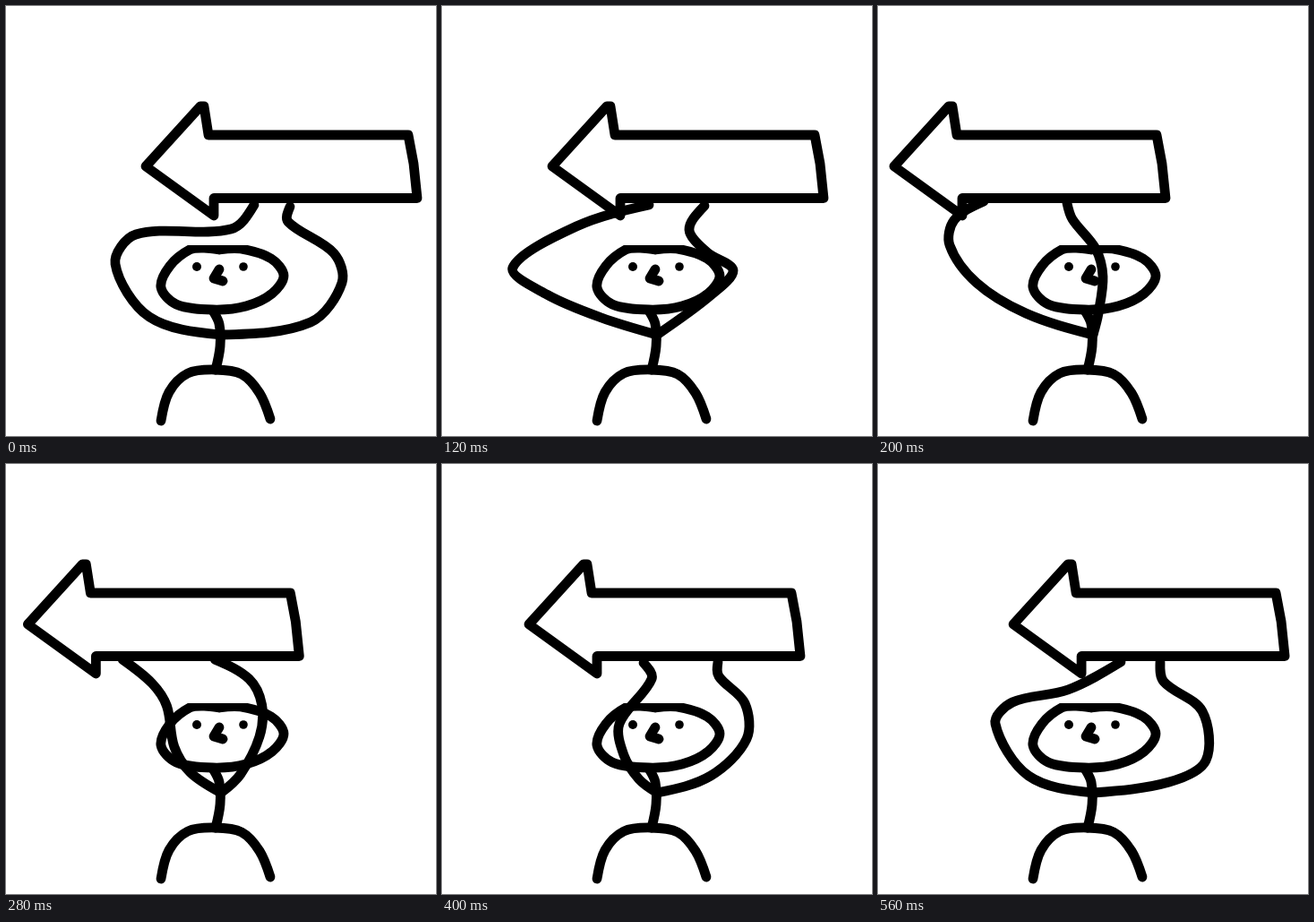
An HTML page for the animation above (600 ms loop, 480 px wide and 480 px high).

```html
<!DOCTYPE html>
<html lang="en">
<head>
<meta charset="utf-8">
<title>Sign spinner</title>
<style>
  html, body { margin: 0; width: 100%; height: 100%; overflow: hidden; background: #fff; }
  svg { display: block; width: 100vw; height: 100vh; }
  .ink { fill: none; stroke: #000; stroke-width: 10.8; stroke-linecap: round; stroke-linejoin: round; }
</style>
</head>
<body>
<svg viewBox="0 0 480 480">
  <clipPath id="crop"><rect y="267" width="480" height="213"/></clipPath>
  <g class="ink">
    <path id="head" clip-path="url(#crop)"/>
    <path id="neck"/>
    <path id="body"/>
    <path d="M238 294L232 304L242 307"/>
    <path id="left"/>
    <path id="right"/>
    <path id="arrow" d="M156 179L217 112H221L226 144H449L455 176L459 214.500H232V234Z"/>
  </g>
  <circle cx="213" cy="291" r="5"/>
  <circle cx="265" cy="291" r="4.800"/>
</svg>
<script>
const STEP = 40, COUNT = 15;
const el = id => document.getElementById(id);
const points = text => text.split(' ').map(p => p.split(',').map(Number));

// Arrow travel: [step, shift]
const travel = points('0,0 3,-33 5,-138 6,-148 8,-109 10,-59 12,-29 15,0');

// Each arm runs from the hand through four bends to the shared shoulder
const shoulder = [240, 367];
const poses = [
  { step: 0, left: '277,222 251,249 145,255 122,288 160,347', right: '317,224 315,241 366,276 375,309 340,353' },
  { step: 3, left: '231,222 150,246 79,292 117,322 178,348', right: '293,223 276,250 296,275 325,295 300,323' },
  { step: 5, left: '118,218 85,239 80,267 110,309 165,343', right: '211,220 217,238 243,271 251,302 246,343' },
  { step: 8, left: '152,219 205,247 220,275 220,320 224,346', right: '255,218 300,241 311,268 306,305 275,347' },
  { step: 10, left: '225,222 234,240 198,290 203,325 220,352', right: '308,221 309,237 338,267 340,307 300,348' },
  { step: 12, left: '257,222 236,248 167,275 152,298 172,337', right: '315,223 316,244 362,284 348,328 300,359' },
  { step: 14, left: '271,221 212,252 150,266 131,290 168,348', right: '315,221 319,243 362,276 366,331 325,355' }
].map(p => ({ step: p.step, left: points(p.left), right: points(p.right) }));

// Smooth value at time t through [time, value] keys, at rest at both ends
function ease(keys, t) {
  const slope = i => keys[i - 1] && keys[i + 1]
    ? (keys[i + 1][1] - keys[i - 1][1]) / (keys[i + 1][0] - keys[i - 1][0]) : 0;
  let i = 0;
  while (i < keys.length - 2 && keys[i + 1][0] <= t) i++;
  const [t0, a] = keys[i], [t1, b] = keys[i + 1];
  const h = t1 - t0, u = (t - t0) / h, v = 1 - u;
  return a * v * v * (1 + 2 * u) + b * u * u * (1 + 2 * v)
    + h * u * v * (slope(i) * v - slope(i + 1) * u);
}

const mix = (p, q, f) => p.map((v, k) => v + (q[k] - v) * f);
const gap = (p, q) => Math.hypot(q[0] - p[0], q[1] - p[1]);

// Smooth pen line, with handles scaled to the spacing of the points
function curve(pts) {
  const handle = (a, b, c) => {
    const f = gap(b, c) / (3 * (gap(a, b) + gap(b, c)));
    return b.map((v, k) => v + (c[k] - a[k]) * f);
  };
  let d = 'M' + pts[0];
  for (let i = 0; i < pts.length - 1; i++) {
    const [a, b, c, e] = [pts[i - 1], pts[i], pts[i + 1], pts[i + 2]];
    let c1 = a && handle(a, b, c);
    const c2 = e ? handle(e, c, b) : mix(c, c1, 0.5);
    c1 = c1 || mix(b, c2, 0.5);
    d += `C${c1} ${c2} ${c}`;
  }
  return d;
}

function arm(side, step) {
  const bends = poses[0][side].map((p, n) =>
    p.map((_, k) => ease(poses.map(q => [q.step, q[side][n][k]]), step)));
  return curve([...bends, shoulder]);
}

function draw(ms) {
  const step = Math.floor(ms / STEP) % COUNT;
  el('arrow').setAttribute('transform', `translate(${ease(travel, step)} 0)`);
  for (const side of ['left', 'right']) el(side).setAttribute('d', arm(side, step));
}

const still = {
  head: '238,272 262,271 296,282 310,301 297,321 268,335 231,339 190,333 173,314 183,290 205,272 221,270 238,272',
  neck: '232,342 238,355 239,380 234,406',
  body: '173,463 182,431 203,410 233,406 263,411 283,432 295,461'
};
for (const id in still) el(id).setAttribute('d', curve(points(still[id])));

const start = performance.now();
function tick() {
  draw(performance.now() - start);
  requestAnimationFrame(tick);
}
tick();
</script>
</body>
</html>
```
